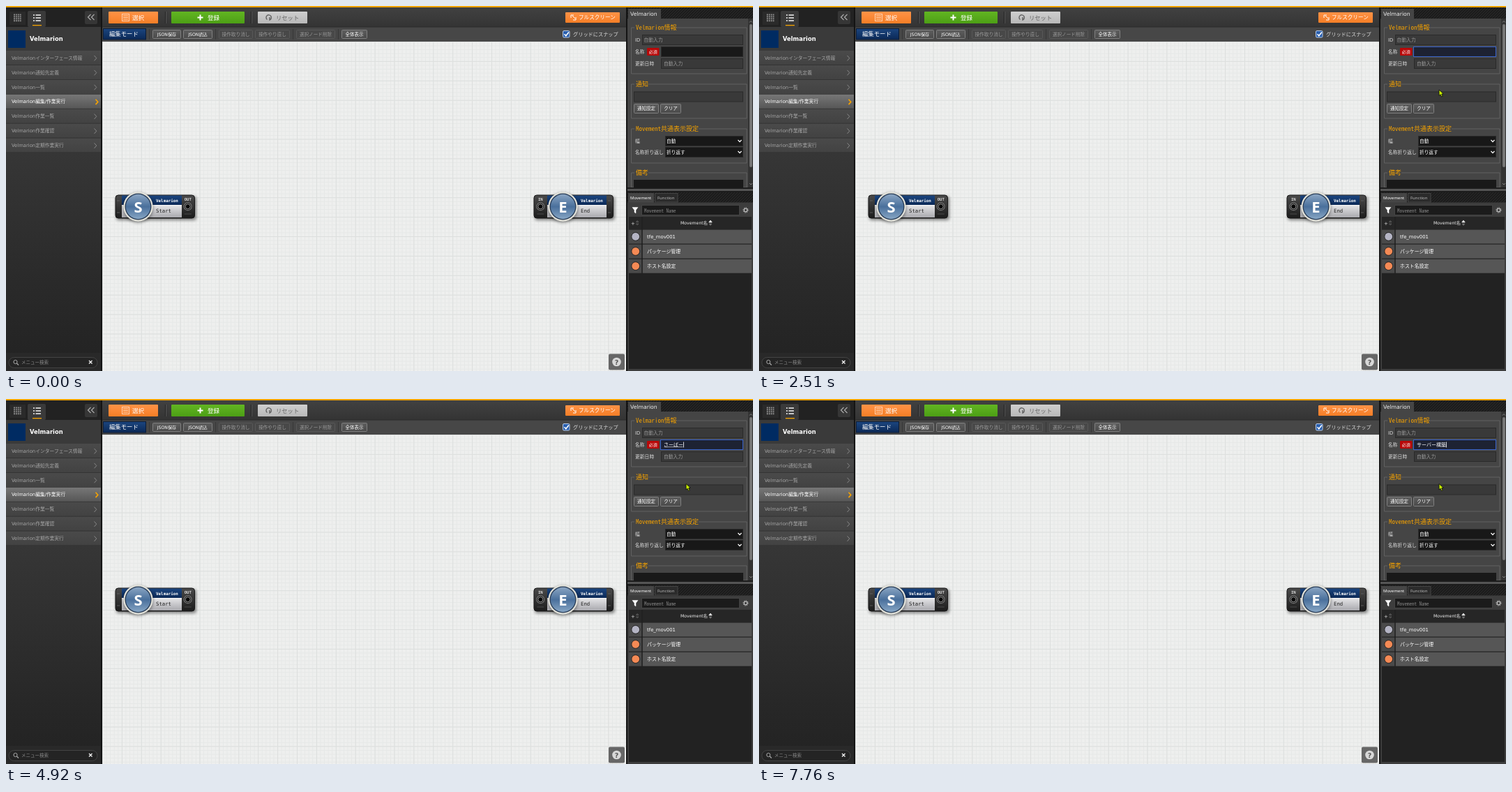
An HTML page that plays this animation: 1071 by 523 pixels, repeating every 8 s.

```html
<!DOCTYPE html>
<html lang="ja">
<head>
<meta charset="utf-8">
<title>Workflow editor</title>
<style>
html, body { margin: 0; width: 100%; height: 100%; overflow: hidden; background: #222; }
svg { display: block; width: 1071px; height: 523px; }
text { font-family: 'DejaVu Sans', 'Noto Sans CJK JP', 'Noto Sans CJK', sans-serif; white-space: pre; }
.mono { font-family: 'Noto Sans Mono CJK JP', 'Noto Sans CJK JP', 'Noto Sans CJK', monospace; }
.code { font-family: 'DejaVu Sans Mono', monospace; }
.ui { font-family: 'Noto Sans', 'Noto Sans CJK JP', 'Noto Sans CJK', sans-serif; }
.ime { font-family: 'Noto Sans CJK JP', 'Noto Sans CJK', sans-serif; font-feature-settings: 'palt'; letter-spacing: -.6px; }
.b { font-weight: bold; }
.mid { text-anchor: middle; }
</style>
</head>
<body>
<svg viewBox="0 0 1071 523">
  <defs id="defs"></defs>
  <g id="page"></g>
  <g id="live"></g>
</svg>
<script>
const APP = 'Velmarion';
const $ = id => document.getElementById(id);

// y is the vertical middle of the text
const text = (x, y, str, size, fill = '#ddd', cls = '') =>
  `<text x="${x}" y="${y + size * .37}" font-size="${size}" fill="${fill}" class="${cls}">${str}</text>`;
const box = (x, y, x2, y2, fill, stroke = 'none', r = 0, more = '') =>
  `<rect x="${x}" y="${y}" width="${x2 - x}" height="${y2 - y}" rx="${r}" fill="${fill}" stroke="${stroke}" ${more}/>`;
const line = (d, stroke, w = 1, fill = 'none') =>
  `<path d="${d}" stroke="${stroke}" stroke-width="${w}" fill="${fill}"/>`;
const disc = (x, y, r, fill, stroke = 'none', w = 1) =>
  `<circle cx="${x}" cy="${y}" r="${r}" fill="${fill}" stroke="${stroke}" stroke-width="${w}"/>`;
const grad = (id, ...stops) => `<linearGradient id="${id}" x2="0" y2="1">${
  stops.map((c, i) => `<stop offset="${i / (stops.length - 1)}" stop-color="${c}"/>`).join('')}</linearGradient>`;
const grid = (id, size, color) => `<pattern id="${id}" x="138" y="51" width="${size}" height="${size}"
  patternUnits="userSpaceOnUse">${line(`M${size} .5H.5V${size}`, color, .8)}</pattern>`;

$('defs').innerHTML =
  grad('side', '#363636', '#222') + grad('row', '#4a4a4a', '#424242') + grad('active', '#777', '#555') +
  grad('orange', '#ff9347', '#f57e26') + grad('green', '#62b522', '#4c9f15') + grad('grey', '#cfcfcf', '#b8b8b8') +
  grad('navy', '#1b457f', '#0b2957') + grad('silver', '#e6e6e8', '#a9a9ae') + grad('ball', '#8aa5c3', '#4a709c', '#86a5c4') +
  grad('dark', '#4a4a4a', '#1c1c1c') + grad('btn', '#5e5e5e', '#4a4a4a') + grad('bar', '#414141', '#343434') +
  grid('fine', 5.58, '#e3e5e4') + grid('wide', 27.9, '#dadcdb') +
  '<filter id="soft" x="-20%" y="-50%" width="140%" height="200%"><feGaussianBlur stdDeviation="2"/></filter>' +
  `<pattern id="hatch" width="4" height="4" patternUnits="userSpaceOnUse">${
    box(0, 0, 4, 4, '#1c1c1c')}${line('M0 4L4 0', '#2b2b2b')}</pattern>`;

function sidebar() {
  let s = box(0, 210, 136, 523, 'url(#side)') + box(0, 2, 136, 30, '#222') +
    box(5, 8, 28, 27, '#2a2a2a') + box(31, 7, 57, 30, '#3a3a3a', 'none', 2) + box(113, 7, 131, 26, '#363636', 'none', 2);
  for (let i = 0; i < 16; i++) s += box(11 + i % 4 * 2.9, 11.5 + (i >> 2) * 2.9, 13 + i % 4 * 2.9, 13.5 + (i >> 2) * 2.9, '#888');
  for (const y of [13, 17, 21]) s += box(39, y - .7, 41, y + .7, '#fff') + box(42.5, y - .7, 50, y + .7, '#fff');
  s += box(38, 27, 51, 28.3, '#f5a200') + line('M121.5 12l-4 4 4 4M126.5 12l-4 4 4 4', '#aaa', 1.2);
  s += box(0, 30, 136, 64, '#3a3a3a') + box(3, 35, 28, 60, '#002b62') + text(34, 46.5, APP, 8.4, '#fff', 'b');
  ['インターフェース情報', '通知先定義', '一覧', '編集/作業実行', '作業一覧', '作業確認', '定期作業実行'].forEach((name, i) => {
    const y = 64 + i * 20.9, on = i == 3;
    s += box(0, y, 136, y + 20.9, `url(#${on ? 'active' : 'row'})`) + box(0, y + 20.2, 136, y + 20.9, '#2a2a2a') +
      text(8, y + 10.2, APP + name, 6.8, on ? '#fff' : '#a5a5a5') +
      line(`M${on ? 128.5 : 126.5} ${y + 7}l3.3 3.7-3.3 3.7`, on ? '#f5a200' : '#888', on ? 1.6 : 1);
  });
  return s + box(0, 497, 136, 523, '#292929') + box(4, 503.5, 131, 518.5, '#242424', '#444', 7.5) +
    disc(13.5, 510, 2.6, 'none', '#aaa') + line('M15.5 512l2.5 2.5', '#aaa', 1.3) +
    text(22, 511, 'メニュー検索', 6.5, '#888') + line('M119 508l4.5 4.5m0-4.5l-4.5 4.5', '#eee', 1.4);
}

function toolbar() {
  let s = box(138, 2, 889, 30, 'url(#bar)') + box(138, 30, 889, 51, '#474747') + box(138, 29.5, 889, 30.5, '#2a2a2a');
  s += box(147, 8, 218, 25, 'url(#orange)', 'none', 1) + box(237, 8, 342, 25, 'url(#green)', 'none', 1) +
    box(361, 8, 432, 25, 'url(#grey)', 'none', 1) + box(802, 9, 880, 24, 'url(#orange)', 'none', 1);
  s += box(166.5, 11.5, 176.5, 21.5, 'none', '#ffd0ae') + line('M168 14h7M168 16.5h7M168 19h7', '#ffd0ae') +
    line('M278.5 12.5v8M274.5 16.5h8', '#fff', 2) + line('M374.5 19.5A3.7 3.7 0 1 1 378 20v-4', '#666', 1.5) +
    line('M810 17v-4h4M812 14l4 4M817 16v4h-4', '#fff');
  s += text(181, 16.5, '選択', 8.5, '#fff') + text(289, 16.5, '登録', 8.5, '#fff') +
    text(387, 16.5, 'リセット', 8.3, '#666') + text(821, 16.5, 'フルスクリーン', 7.6, '#fff');
  for (const x of [228, 351]) s += box(x, 8, x + 1, 25, '#222') + box(x + 1, 8, x + 2, 25, '#555');
  s += box(139.5, 32.5, 200.5, 48, 'url(#navy)', '#0a1c38') + text(148, 40, '編集モード', 8.4, '#fff');
  [[210, 251, 'JSON保存', 6.2, 1], [254, 296, 'JSON読込', 6.2, 1], [305, 354, '操作取り消し', 6.7],
   [357, 407, '操作やり直し', 6.7], [416, 472, '選択ノード削除', 6.6], [481, 518, '全体表示', 6.5, 1]]
    .forEach(([a, b, name, size, on]) => {
      s += box(a + .5, 34.5, b - .5, 46.5, on ? 'url(#btn)' : '#484848', on ? '#808080' : '#585858', 1) +
        text((a + b) / 2, 40.5, name, size, on ? '#fff' : '#999', 'mid');
    });
  for (const x of [205, 300, 411, 476]) s += box(x, 33, x + 1, 48, '#383838');
  return s + box(798.5, 35.5, 808, 45, '#2a5fae', '#b9cdea', 1.5) + line('M800.5 40.2l2.3 2.6 4-5.4', '#fff', 1.6) +
    text(813, 40.5, 'グリッドにスナップ', 7.2);
}

function node(x, mark, name, inner, inner2, ball, port, portName, tx) {
  return box(x + 1, 273, x + 116, 307, '#000', 'none', 4, 'opacity=".45" filter="url(#soft)"') +
    box(x, 271, x + 113.5, 304, 'url(#dark)', '#161616', 4) +
    box(inner, 271.5, inner2, 285, 'url(#navy)') + box(inner, 285, inner2, 303, 'url(#silver)') +
    box(inner, 285, inner2, 286.2, '#f6f6f6') +
    `<circle cx="${ball}" cy="289" r="21.5" opacity=".4" filter="url(#soft)"/>` +
    disc(ball, 287.5, 21.2, '#e2e2da') + disc(ball, 287.5, 19, '#263a55') + disc(ball, 287.5, 17.7, 'url(#ball)') +
    text(ball, 287.5, mark, 22, '#fff', 'ui b mid') +
    text(tx, 278.8, APP, 5.9, '#fff', 'code b') + text(tx, 293, name, 7.3, '#222', 'code') +
    text(port, 277.3, portName, 5.6, '#ddd', 'code b mid') +
    disc(port, 287.3, 5.4, '#050505', '#777', 1.2) + disc(port, 287.3, 3.5, 'none', '#aaa', .9) +
    line(`M${port - 5} 298h10`, '#555', .8) + line(`M${port < ball ? x + 106 : x + 2} 279h4m-4 17h4`, '#666', .8);
}

function fieldset(y, y2, name, w) {
  return line(`M901 ${y}H896.5V${y2}H1062V${y}H${905 + w}`, '#656565', .9) + text(903, y, name, 9, '#f5a200', 'mono');
}

function panel() {
  const field = (x, y, fill = '#393939') => box(x + .5, y + .5, 1056.5, y + 14.5, fill, '#2a2a2a');
  const button = (a, b, y, name) => box(a + .5, y + .5, b - .5, y + 13.5, 'url(#btn)', '#808080', 1) +
    text((a + b) / 2, y + 7, name, 6.5, '#fff', 'mid');
  const select = (y, name) => field(945, y, '#181818') + text(947, y + 7.3, name, 6.7, '#fff') +
    line(`M1049.5 ${y + 6}l2.5 2.6 2.5-2.6`, '#fff', 1.3);
  let s = box(891, 2, 1071, 523, '#222') + box(891, 2, 1071, 18, 'url(#hatch)') + box(892, 4, 939, 19, '#454545') +
    text(895, 11.5, APP, 7.7, '#eee') + box(891, 18, 1071, 260, '#454545');
  s += fieldset(31, 97, APP + '情報', 56) + text(902, 48.5, 'ID', 6.8) + field(912, 41) + text(914.5, 48.5, '自動入力', 6.8, '#999') +
    text(902, 65.5, '名称', 6.8) + box(919, 60, 936.5, 71, '#b80808', 'none', 1) + text(927.7, 65.5, '必須', 6, '#fff', 'mid') +
    field(939, 58, '#191919') + text(902, 82, '更新日時', 6.8) + field(939, 75) + text(943, 82.5, '自動入力', 6.8, '#999');
  s += fieldset(112, 161, '通知', 16) + field(900, 122.5) + button(900, 936, 140, '通知設定') + button(938, 968, 140, 'クリア');
  s += fieldset(176, 225, 'Movement共通表示設定', 88) + text(902, 193, '幅', 6.8) + select(186, '自動') +
    text(902, 209.5, '名称折り返し', 6.8) + select(202, '折り返す');
  s += fieldset(239, 260, '備考', 16) + box(900, 249, 1057, 260, '#191919') +
    box(1064, 18, 1071, 260, '#333') + box(1066, 26, 1070, 231, '#777', 'none', 2) +
    line('M1066 23.5l2-2 2 2M1066 254l2 2 2-2', '#999', .8);
  s += box(891, 260, 1071, 267, '#1c1c1c') + box(891, 262, 1071, 265, '#555') + box(891, 267, 1071, 282, 'url(#hatch)') +
    box(892, 268, 929, 282, '#454545') + box(930.5, 268.5, 963, 281, '#2b2b2b', '#444') +
    text(895, 274.5, 'Movement', 6, '#fff', 'ui') + text(934, 274.5, 'Function', 6, '#bbb', 'ui') +
    box(891, 281.5, 1071, 303, '#3d3d3d') + line('M898 288.5h8l-3 4v4.5l-2-1.5v-3z', '#fff', .5, '#fff') +
    box(911.5, 285.5, 1051.5, 299.5, '#1b1b1b', '#444') + text(915, 293, 'Movement Name', 7, '#888', 'mono') +
    disc(1060.5, 292.5, 2.3, 'none', '#bbb', 1.3) + `<circle cx="1060.5" cy="292.5" r="3.6" fill="none" stroke="#bbb" stroke-dasharray="1.4"/>`;
  s += box(893, 302, 1069, 320, '#262626') + text(896, 311, '+', 7) + line('M903.5 309.5l1.7-2 1.7 2zM903.5 312l1.7 2 1.7-2z', '#666', .8) +
    text(967, 311, 'Movement名', 6.2, '#eee') + line('M1007.7 310l2.3-3 2.3 3z', '#fff', .5, '#fff') + line('M1008 312l2 2.5 2-2.5z', '#777', .5, '#777');
  ['tfe_mov001', 'パッケージ管理', 'ホスト名設定'].forEach((name, i) => {
    const y = 320 + i * 21.1;
    s += box(893, y + .6, 911.5, y + 20.5, '#4a4a4a') + box(912.5, y + .6, 1069, y + 20.5, '#565656') +
      disc(902.7, y + 10.4, 5.9, i ? '#f58a55' : '#b4b4c4', '#222') + text(919, y + 10.4, name, 6.9, '#fff');
  });
  return s + box(911.5, 302, 912.5, 383, '#1c1c1c') + box(893, 384, 1069, 520, '#222') +
    box(1069, 282, 1071, 523, '#3d3d3d') + box(891, 520, 1071, 523, '#3d3d3d') + box(891, 282, 893, 523, '#3d3d3d');
}

$('page').innerHTML = box(0, 0, 1071, 523, '#141414') + sidebar() + toolbar() +
  box(138, 51, 889, 523, '#eeefee') + box(138, 51, 889, 523, 'url(#fine)') + box(138, 51, 889, 523, 'url(#wide)') +
  node(157, 'S', 'Start', 166, 252, 189.5, 260.7, 'OUT', 215) +
  node(757, 'E', 'End', 776, 861, 798.5, 766.3, 'IN', 824) +
  box(864, 498.5, 887, 521.5, '#666', 'none', 2) + disc(875.5, 510, 6.3, '#d8d8d8') + text(875.5, 510, '?', 9.5, '#555', 'b mid') +
  panel() + box(0, 0, 1071, 2, '#f5a200');

// Input method: start time, committed text, text being composed, candidate list
const lists = {
  sa: [110, 4, 'さらに', 'さん', 'さまざまな', '作成', '作業'],
  saa: [123, 4, 'サービス', 'サーバー', 'サービスの', 'サーチ', 'サーバーに'],
  saba: [114, 4, 'サーバーに', 'サーバー', 'サーバーの', 'サーバ', 'サーバーへの'],
  sabaa: [110, 4, 'サーバー', 'サーバーに', 'サーバーの', 'サーバーへ', 'サーバーを'],
  ko: [102, 5, 'この', 'こと', 'これ', 'ここ', '今回'],
  kou: [102, 5, '更新', '項目', '構成', '購入', '公開'],
  kouchi: [87, 5, '構築', '更新', '項番', '項目', '購入']
};
const keys = [
  [0, '', ''], [2920, '', 'ｓ'], [3020, '', 'さ', 'sa'], [3260, '', 'さー', 'saa'], [3570, '', 'さーｂ', 'saa'],
  [3700, '', 'さーば', 'saba'], [3880, '', 'さーばー', 'sabaa'], [4920, '', 'さーばー'], [4950, '', 'サーバー'],
  [5220, 'サーバー', ''], [5720, 'サーバー', 'ｋ'], [5840, 'サーバー', 'こ', 'ko'], [6070, 'サーバー', 'こう', 'kou'],
  [6760, 'サーバー', 'こうｔ', 'kou'], [6910, 'サーバー', 'こうち', 'kouchi'], [7000, 'サーバー', 'こうちｋ', 'kouchi'],
  [7150, 'サーバー', 'こうちく', 'kouchi'], [7300, 'サーバー', 'こうちく'], [7330, 'サーバー', '構築'], [7760, 'サーバー構築', '']
];
const FOCUS = 1580, EM = 7;

function popup(x, [w, dots, ...words]) {
  const r = x + w;
  let s = box(x + 1, 71, r + 1, 200, '#000', 'none', 4, 'opacity=".3"') + box(x, 69.5, r, 198.5, '#fafafa', '#ddd', 4, 'stroke-width=".6"') +
    text(x + 7, 79, 'Tab キーを押して選択します', 6.5, '#666', 'ime');
  words.forEach((word, i) => {
    const y = 98.3 + i * 18.4;
    s += text(x + 9, y, i + 1, 7.5, '#999', 'ui') + text(x + 19, y, word, 8.5, '#222', 'ime');
  });
  for (let i = 0; i < dots; i++) s += disc(r - (dots > 4 ? 7 : 2), (dots > 4 ? 121.5 : 125) + i * 6.8, i ? 1.1 : 1.6, '#888');
  return s + box(x, 181.5, r, 182.2, '#e2e2e2') +
    line(`M${x + 12.5} 192h5l-2.5-3.5zM${x + 26.5} 189h5l-2.5 3.5z`, 'none', 0, '#222') +
    box(r - 13, 187, r - 6, 194.5, 'none', '#333', 1.5) + box(r - 9, 186, r - 5, 190, '#222', 'none', 1);
}

// Pointer path: time, x, y of the tip
const path = [[440, 944, 523], [700, 958, 372], [950, 974, 185], [1220, 988, 69], [1300, 989, 65], [1640, 989, 65],
  [1800, 982, 92], [1980, 975, 120], [2510, 975, 120], [2640, 975, 121.5]];
function pointerAt(t) {
  const i = path.findIndex(p => p[0] > t);
  if (i < 0) return path[path.length - 1].slice(1);
  const [a, x, y] = path[i - 1], [b, x2, y2] = path[i], k = (t - a) / (b - a);
  return [x + (x2 - x) * k, y + (y2 - y) * k];
}
function pointer(x, y) {
  if (x > 939 && x < 1057 && y > 58 && y < 73) {
    const beam = `M${x - 2.5} ${y - 4.5}h5m-2.5 0v9m-2.5 0h5`;
    return line(beam, '#000', 2.4) + line(beam, '#e0f000', 1.1);
  }
  return line(`M${x} ${y}v8.5l2-1.7 1.5 3.2 1.7-.8-1.5-3 2.6-.4z`, '#111', .9, '#c8f000');
}

function tooltip(alpha) {
  return `<g opacity="${alpha}">${box(869, 35.5, 1071, 53, '#0005', 'none', 3)}${box(870, 35, 1070, 52, '#e6e6e6', 'none', 3)}${
    line('M974 52h9l-4.5 4.5z', 'none', 0, '#e6e6e6')}${
    text(874, 43.3, APP + '名称を入力します。[最大長]255バイト', 8.64, '#333', 'mono')}</g>`;
}

function render(t) {
  let s = '';
  const [at, done, typing, list] = keys.filter(k => k[0] <= t).pop();
  if (t >= FOCUS) {
    const from = 943 + done.length * EM, end = from + typing.length * EM;
    s += box(938.5, 58.5, 1056.5, 72.5, '#1d2233', '#3a64cc') +
      text(943, 65.5, done + typing, EM, '#fff', 'mono');
    if (typing) s += box(from + .7, 68.4, end - .5, 69.1, '#ddd');
    if (Math.floor((t - Math.max(at, FOCUS)) / 530) % 2 == 0) s += box(end, 61.5, end + .8, 69.5, '#fff');
    if (list) s += popup(done ? 958 : 930, lists[list]);
  }
  if (t >= 440) {
    const [x, y] = pointerAt(t), row = Math.floor((y - 320) / 21.1);
    if (row >= 0 && row < 3) s += box(893, 320.6 + row * 21.1, 1069, 340.5 + row * 21.1, '#fff', 'none', 0, 'opacity=".08"');
    const alpha = Math.min(1, (t - 1250) / 120, (1900 - t) / 120);
    if (alpha > 0) s += tooltip(alpha);
    s += pointer(x, y);
  }
  return s;
}

let shown;
function tick() {
  const now = render(performance.now() % 8000);
  if (now !== shown) $('live').innerHTML = shown = now;
  requestAnimationFrame(tick);
}
tick();
</script>
</body>
</html>
```
